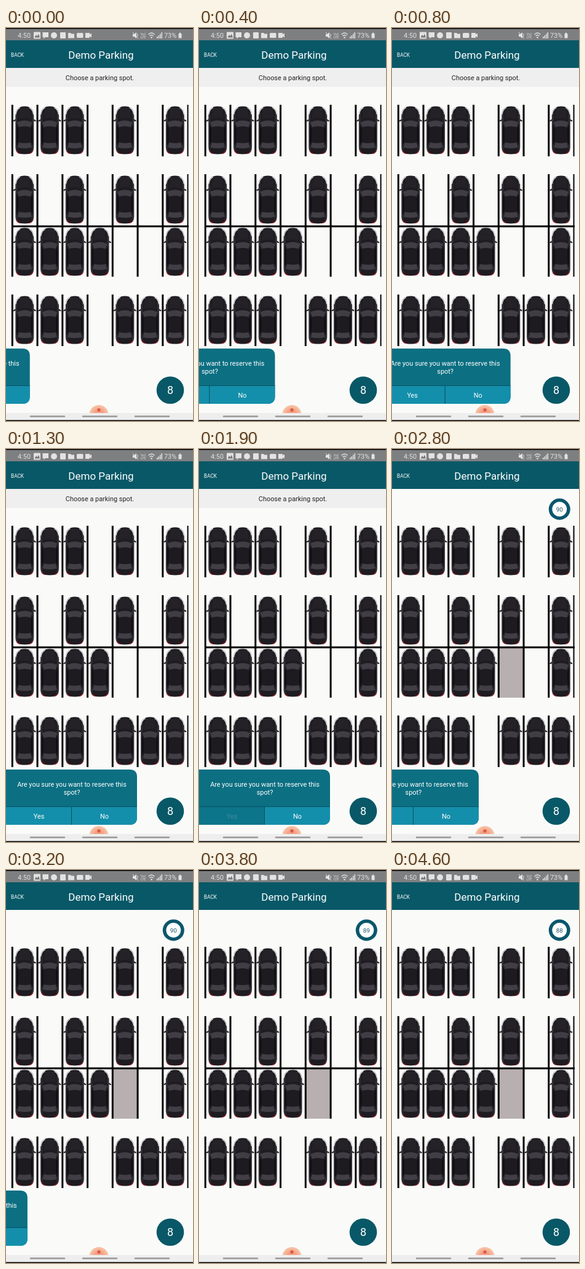
Recreate the animation shown at these times as an HTML page. Size 304x640 px, loop 4700 ms.

```html
<!DOCTYPE html>
<html lang="en">
<head>
<meta charset="utf-8">
<title>Demo Parking</title>
<style>
  html, body { margin: 0; width: 100%; height: 100%; overflow: hidden; background: #fafbf9; }
  svg { display: block; width: 304px; height: 640px; font: 10.9px Roboto, sans-serif; fill: #fff; }
  text { text-anchor: middle; }
  #status { fill: #e2e2e2; }
</style>
</head>
<body>
<svg viewBox="0 0 304 640">
  <defs>
    <linearGradient id="paint">
      <stop offset="0" stop-color="#3a393e"/>
      <stop offset=".14" stop-color="#1e1b21"/>
      <stop offset=".86" stop-color="#1e1b21"/>
      <stop offset="1" stop-color="#3a393e"/>
    </linearGradient>
    <radialGradient id="glow">
      <stop offset=".45" stop-color="#f2a085"/>
      <stop offset="1" stop-color="#f9c5a8"/>
    </radialGradient>
    <!-- Car seen from above, centred on x = 0 -->
    <g id="car">
      <path d="M-14 20.500L-18.500 23L-18 25L-14 23.500ZM14 20.500L18.500 23L18 25L14 23.500Z" fill="#2a282d"/>
      <path d="M-15 16C-15 5-10 0 0 0S15 5 15 16V66C15 75 11 78 0 78S-15 75-15 66Z" fill="url(#paint)"/>
      <path d="M-8 3Q0 1 8 3L10 21Q0 17-10 21Z" fill="#242127"/>
      <path d="M-14.500 13Q-13.500 5-7.500 2M14.500 13Q13.500 5 7.500 2" fill="none" stroke="#d9dbde" stroke-width="1.500"/>
      <path d="M-12 26Q0 20 12 26L9.500 34Q0 31-9.500 34Z" fill="#403e44"/>
      <path d="M-13 29L-10.500 37V56L-13 64ZM13 29L10.500 37V56L13 64Z" fill="#0e0c11"/>
      <path d="M-9.500 35Q0 32 9.500 35V58Q0 60-9.500 58Z" fill="#1d1a20"/>
      <path d="M-9.500 59Q0 61 9.500 59L11.500 67Q0 70-11.500 67Z" fill="#413f45"/>
      <path d="M-13.500 72Q-12 76.500-7 77M13.500 72Q12 76.500 7 77" fill="none" stroke="#a12c32" stroke-width="1.300"/>
    </g>
  </defs>

  <rect width="304" height="640" fill="#fafbf9"/>
  <rect y="20" width="304" height="45" fill="#085867"/>
  <text x="18.500" y="46.700" font-size="8.200">BACK</text>
  <text x="154.500" y="50" font-size="17">Demo Parking</text>

  <g id="status">
    <rect width="304" height="20" fill="#7e7f80"/>
    <text x="29.500" y="16">4:50</text>
    <rect x="45" y="6.500" width="11" height="11" rx="1"/>
    <path d="M46.500 15.500L49 11L51 13.500L53 9.500L55 15.500Z" fill="#777"/>
    <path d="M59.500 7H69V15H64L61.500 17.500V15H59.500Z"/>
    <circle cx="78" cy="12" r="5"/>
    <rect x="88" y="7" width="9" height="10" rx="1"/>
    <path d="M101 8H105L106.500 9.500H111V16.500H101Z"/>
    <rect x="115" y="8" width="10.500" height="8" rx="1.500"/>
    <path d="M129 8H136V10.500L139 8.500V15.500L136 13.500V16H129Z"/>
    <path d="M206 10H208.500L212 7V17L208.500 14H206Z"/>
    <path d="M206 7L215 17M213.500 9Q215 12 213.500 14" fill="none" stroke="#e2e2e2"/>
    <text x="223" y="11.500" font-size="5.500">Vo)</text>
    <text x="223" y="17" font-size="5.500">LTE</text>
    <path d="M231.500 10.500Q236.500 5.500 241.500 10.500M233.500 13Q236.500 10 239.500 13" fill="none" stroke="#e2e2e2" stroke-width="1.300"/>
    <circle cx="236.500" cy="15.500" r="1.300"/>
    <path d="M245 14h1.500v3H245zm2.500-2h1.500v5h-1.500zm2.500-2.500h1.500v7.500H250zm2.500-2.500h1.500v10h-1.500z"/>
    <text x="267" y="16">73%</text>
    <path d="M280.500 9H282V7.500H284V9H285.500V16.500H280.500Z"/>
  </g>

  <g id="hint">
    <rect y="65" width="304" height="31" fill="#efefef"/>
    <text x="152.500" y="84.500" fill="#222">Choose a parking spot.</text>
  </g>
  <rect id="reserved" x="174" y="324" width="39" height="81" fill="#b8b0b0"/>
  <g id="lot"></g>
  <g id="timer">
    <circle cx="272.300" cy="98" r="14.700" stroke="#0b566c" stroke-width="5.600"/>
    <text id="count" x="272.300" y="101.700" font-size="9.800" fill="#1f5468"></text>
  </g>

  <circle cx="267" cy="589.800" r="22.300" fill="#085867"/>
  <text x="267" y="596.300" font-size="18">8</text>
  <circle cx="151" cy="629.500" r="15.500" fill="url(#glow)"/>
  <circle cx="151" cy="622" r="2.700" fill="#df5a45"/>
  <rect y="627" width="304" height="13" fill="#eeeeee"/>
  <path d="M40 632.500H95M125 632.500H180M210 632.500H265" stroke="#979797" stroke-width="2.500" stroke-linecap="round"/>
  <path d="M0 .75H304M0 639.250H304" stroke="#000" stroke-width="1.500"/>

  <g id="panel">
    <path d="M0 522H201Q213 522 213 534V600Q213 612 201 612H0Z" fill="#0c6f82"/>
    <text x="107" y="550">Are you sure you want to reserve this</text>
    <text x="107" y="563">spot?</text>
    <g id="yes">
      <path d="M0 582.500H106.500V612H0Z" fill="#148fab"/>
      <text x="53.500" y="602">Yes</text>
    </g>
    <path d="M106.500 582.500H213V600Q213 612 201 612H106.500Z" fill="#148fab"/>
    <text x="160" y="602">No</text>
    <path d="M0 582.500H213M106.500 582.500V612" stroke="#075264" fill="none"/>
  </g>
</svg>
<script>
const LOOP = 4700, PANEL_WIDTH = 213, RESERVED_AT = 2250, BAY = 40.75;
const el = id => document.getElementById(id);
const clamp = x => Math.min(1, Math.max(0, x));
const easeInOut = u => u < .5 ? 2 * u * u : 1 - 2 * (1 - u) ** 2;

// Top of each row, and the occupied bays in it
const rows = [[125, [0, 1, 2, 4, 6]], [238, [0, 2, 4, 6]], [323, [0, 1, 2, 3, 6]], [434, [0, 1, 2, 4, 5, 6]]];
let lot = '<path d="M9 323H297" stroke="#000" stroke-width="3"/>';
for (const [top, bays] of rows) {
  for (let i = 0; i < 8; i++)
    lot += `<path d="M${10.3 + BAY * i} ${top}V${top + (top === 323 ? 82 : 84)}" stroke="#000" stroke-width="${i < 7 ? 3 : 2}"/>`;
  for (const bay of bays)
    lot += `<use href="#car" x="${30.3 + BAY * bay}" y="${top + 2.6}"/>`;
}
el('lot').innerHTML = lot;

function panelOffset(t) {
  if (t < 2200) return PANEL_WIDTH * (easeInOut(clamp(.301 + .0006 * t)) - 1);
  return -235 * easeInOut(clamp((t - 2200) / 1535));
}

function draw(now) {
  const t = now % LOOP, reserved = t >= RESERVED_AT;
  el('panel').setAttribute('transform', `translate(${panelOffset(t)} 0)`);
  el('yes').setAttribute('opacity', 1 - .8 * (clamp((t - 1730) / 150) - clamp((t - 2200) / 200)));
  el('hint').style.display = reserved ? 'none' : '';
  for (const id of ['reserved', 'timer']) el(id).style.display = reserved ? '' : 'none';
  el('count').textContent = t < 3500 ? 90 : t < 4500 ? 89 : 88;
}

function tick() {
  draw(performance.now());
  requestAnimationFrame(tick);
}
tick();
</script>
</body>
</html>
```
